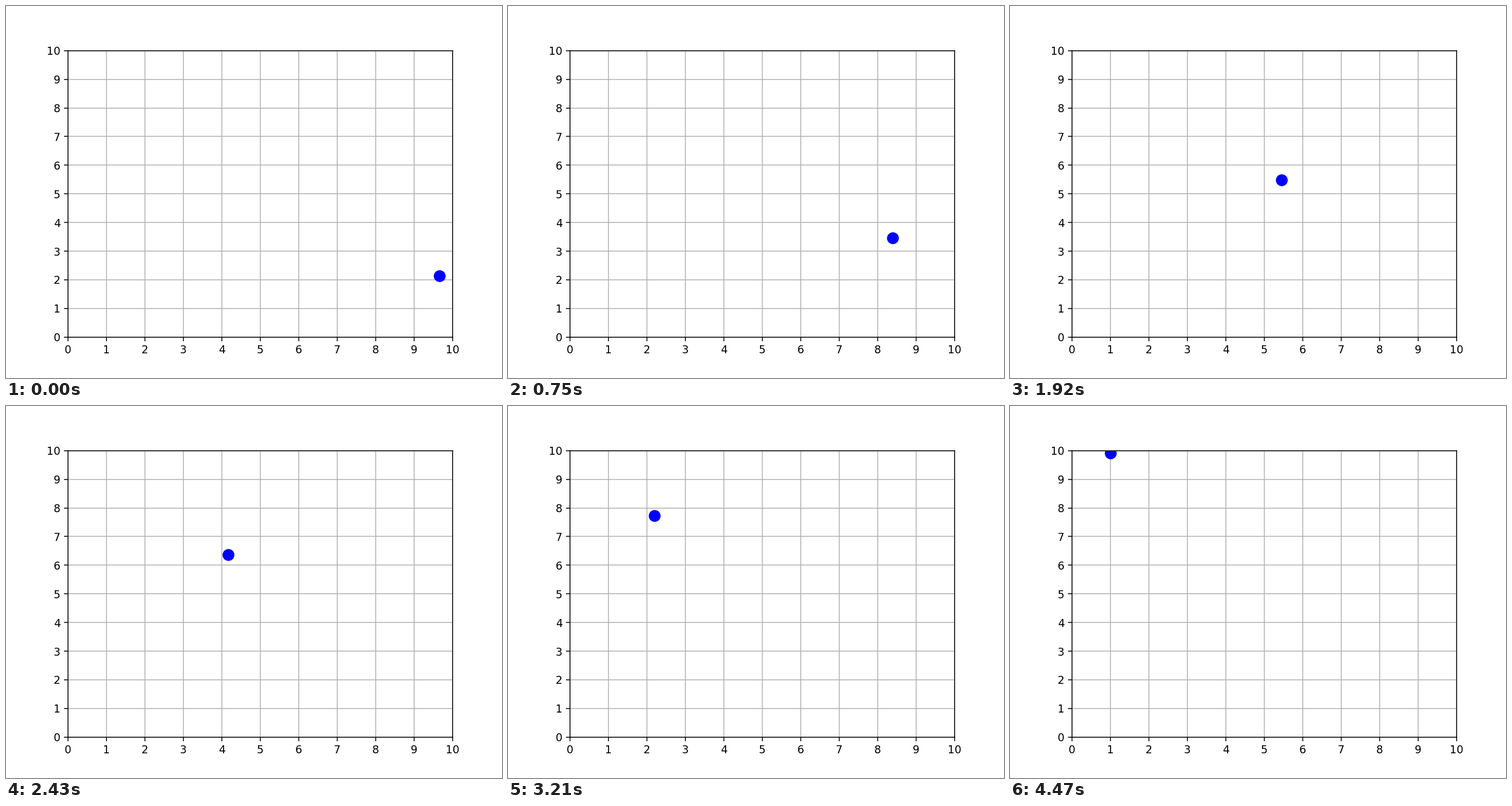
Write a matplotlib script that moves like this. It is 864 by 648 pixels and loops after 4.5 s.

```python
import matplotlib.pyplot as plt
from matplotlib.animation import FuncAnimation

FRAMES = 150
INTERVAL = 30
SIZE = 10
START = (9.668, 2.147)
VELOCITY = (0.07543, 0.0522)


def bounce(pos, step):
    """Positions along one axis, turning back before leaving 0..SIZE."""
    path = []
    for _ in range(FRAMES):
        path.append(pos)
        if not 0 <= pos + step <= SIZE:
            step = -step
        pos += step
    return path


xs, ys = (bounce(p, v) for p, v in zip(START, VELOCITY))

fig, ax = plt.subplots(figsize=(6.4, 4.8), dpi=135)
ax.set_xlim(0, SIZE)
ax.set_ylim(0, SIZE)
ax.set_xticks(range(SIZE + 1))
ax.set_yticks(range(SIZE + 1))
ax.grid(True)
ball, = ax.plot(xs[:1], ys[:1], "o", color="#0000ff", markersize=10)


def update(frame):
    ball.set_data([xs[frame]], [ys[frame]])
    return ball,


anim = FuncAnimation(fig, update, frames=FRAMES, interval=INTERVAL,
                     repeat=True, repeat_delay=0)
plt.show()
```
